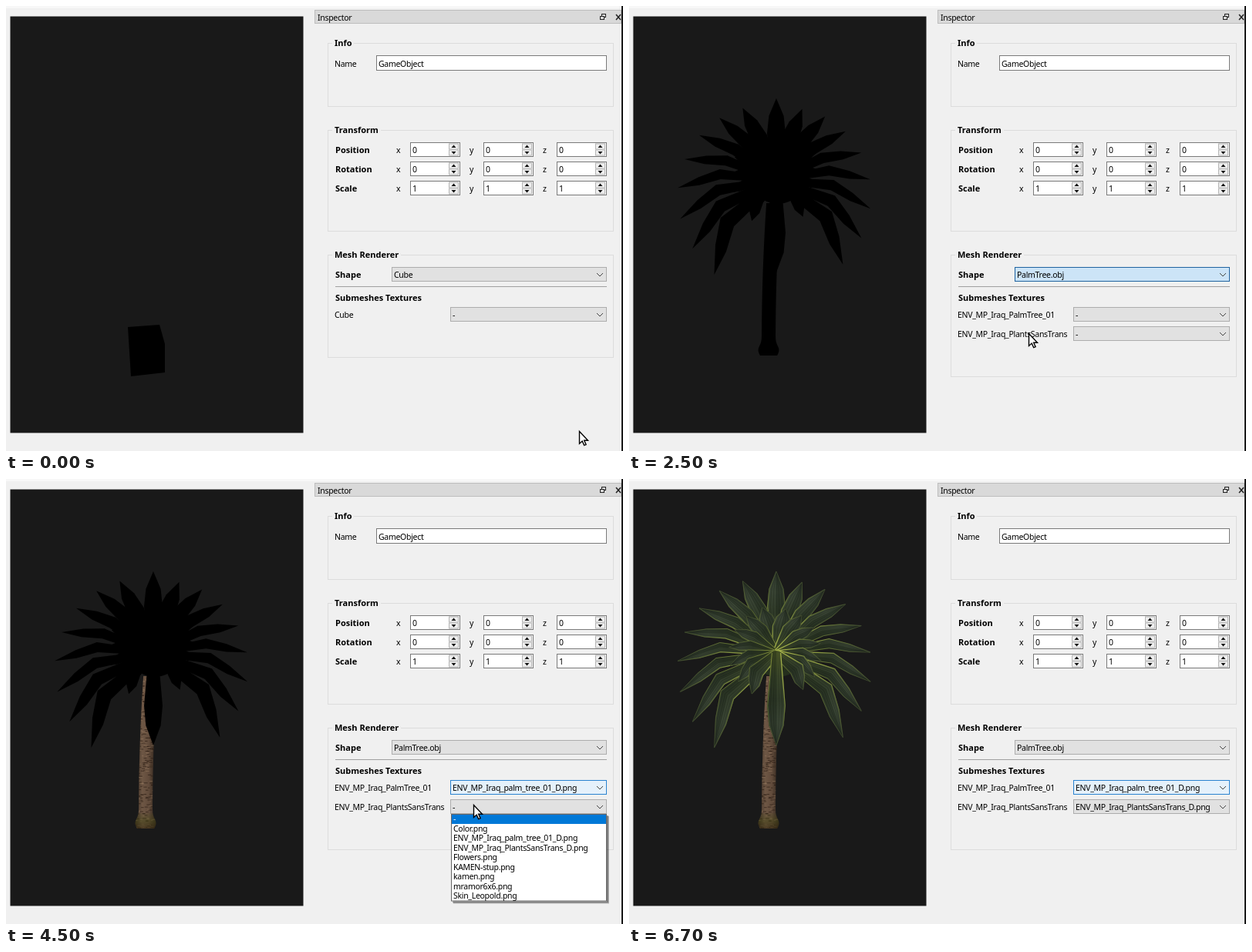
Animation of 800 by 578 pixels, one loop 7100 ms. Source, as an HTML page with a canvas:

```html
<!DOCTYPE html>
<html lang="en">
<head>
<meta charset="utf-8">
<title>Inspector</title>
<style>
html, body { margin: 0; width: 100%; height: 100%; overflow: hidden; background: #f0f0f0; }
canvas { display: block; }
</style>
</head>
<body>
<canvas id="stage" width="800" height="578"></canvas>
<script>
const ctx = document.getElementById('stage').getContext('2d');
const LOOP = 7100, ROW = 12.5;
const SHAPES = ['-', 'Cube', 'Sphere', 'Plane', 'bunny.obj', 'PalmTree.obj', 'Leopold.obj', 'dvorana.obj', 'arkada.obj', 'teapot.obj'];
const TEXTURES = ['-', 'Color.png', 'ENV_MP_Iraq_palm_tree_01_D.png', 'ENV_MP_Iraq_PlantsSansTrans_D.png', 'Flowers.png', 'KAMEN-stup.png', 'kamen.png', 'mramor6x6.png', 'Skin_Leopold.png'];

// Moments when a list opens and when its entry is chosen
const OPEN = { shape: 900, trunk: 3100, leaves: 4400 };
const PICK = { shape: 2500, trunk: 4000, leaves: 5400 };

// Pointer rests: arrival, departure, x, y
const STOPS = [
  [0, 0, 743, 552], [800, 1200, 519, 345], [1800, PICK.shape, 518, 425], [3000, 3200, 634, 400],
  [3600, PICK.trunk, 640, 441], [4300, 4600, 606, 423], [5200, 5700, 627, 480], [6400, LOOP, 650, 582]
];

const CROWN = [191, 226];

function seeded(seed) {
  return () => (seed = (seed * 16807) % 2147483647) / 2147483647;
}

function rect(x, y, w, h, fill, stroke) {
  ctx.fillStyle = fill;
  ctx.fillRect(x, y, w, h);
  if (!stroke) return;
  ctx.strokeStyle = stroke;
  ctx.lineWidth = 1;
  ctx.strokeRect(x + .5, y + .5, w - 1, h - 1);
}

function trace(points, closed = true) {
  ctx.beginPath();
  points.forEach(([x, y]) => ctx.lineTo(x, y));
  if (closed) ctx.closePath();
}

function shape(points, fill) {
  trace(points);
  ctx.fillStyle = fill;
  ctx.fill();
}

function line(points, color, width = 1) {
  trace(points, false);
  ctx.strokeStyle = color;
  ctx.lineWidth = width;
  ctx.stroke();
}

function text(str, x, y, { bold = false, color = '#000' } = {}) {
  ctx.font = bold ? 'bold 11px "Noto Sans", sans-serif' : '10.5px "Noto Sans", sans-serif';
  ctx.letterSpacing = bold ? '0px' : '-0.3px';
  ctx.fillStyle = color;
  ctx.fillText(str, x, y + 4);
}

function gradient(from, to, ...colors) {
  const g = ctx.createLinearGradient(...from, ...to);
  colors.forEach((c, i) => g.addColorStop(i / (colors.length - 1), c));
  return g;
}

function group(title, y, bottom, gapEnd) {
  ctx.strokeStyle = '#dcdcdc';
  ctx.lineWidth = 1;
  ctx.strokeRect(417.5, y + .5, 370, bottom - y);
  rect(423, y - 1, gapEnd - 423, 3, '#f0f0f0');
  text(title, 426, y, { bold: true });
}

function spinBox(x, y, value) {
  rect(x, y - 9, 65, 19, '#fff', '#7a7a7a');
  text(value, x + 3, y + 1);
  for (const dir of [-1, 1]) {
    const cy = y + .5 + dir * 4;
    rect(x + 50, cy - 4, 13, 8, '#f0f0f0', '#b4b4b4');
    shape([[x + 53.5, cy - dir * 1.5], [x + 59.5, cy - dir * 1.5], [x + 56.5, cy + dir * 2]], '#111');
  }
}

const LOOKS = {
  idle: ['#e1e1e1', '#adadad'],
  hover: ['#e5f1fb', '#2a83d0'],
  down: ['#cce4f7', '#1f63a0'],
  fading: ['#d2dfec', '#4b82b4']
};

function combo(x, y, label, look) {
  rect(x, y - 10, 779 - x, 19, ...LOOKS[look]);
  text(label, x + 3, y);
  line([[766, y - 2], [770, y + 2], [774, y - 2]], '#444');
}

function popup(x, top, items, selected, [px, py]) {
  const h = items.length * ROW + 1, w = 779 - x;
  rect(x + 3, top + 3, w, h, 'rgba(0,0,0,.25)');
  rect(x + 2, top + 2, w, h, 'rgba(0,0,0,.3)');
  rect(x, top, w, h, '#fff', '#666');
  if (px >= x && py >= top && py < top + h) selected = Math.floor((py - top) / ROW);
  items.forEach((item, i) => {
    const y = top + i * ROW;
    if (i === selected) rect(x + 1, Math.round(y) + 1, w - 2, 12, '#0078d7');
    text(item, x + 3, Math.round(y + 6), { color: i === selected ? '#fff' : '#000' });
  });
}

function drawTrunk(textured) {
  const left = [], right = [];
  for (let y = 256; y <= 454; y += 3) {
    const center = 181 + 6 * ((440 - y) / 182) ** 2;
    const half = 9 + 4.5 * Math.exp(-(((y - 447) / 8) ** 2));
    left.push([center - half, y]);
    right.unshift([center + half, y]);
  }
  const outline = [...left, ...right];
  if (!textured) return shape(outline, '#000');
  shape(outline, gradient([168, 0], [194, 0], '#3a2d22', '#6e5745', '#614b3b', '#2f241b'));
  ctx.save();
  trace(outline);
  ctx.clip();
  const rnd = seeded(77);
  for (let i = 0; i < 330; i++) {
    const x = 167 + rnd() * 28, y = 256 + rnd() * 198;
    rect(x, y, 2 + rnd() * 3, 1, rnd() < .55 ? 'rgba(35,22,14,.6)' : 'rgba(165,135,105,.4)');
  }
  rect(165, 434, 32, 20, gradient([0, 434], [0, 454], 'rgba(70,75,25,.1)', 'rgba(66,68,20,.5)', 'rgba(50,38,14,.6)'));
  ctx.restore();
}

// angle: degrees from straight up; side: -1 left, 1 right, 0 not drooping sideways
function drawLeaf(angle, side, length, textured) {
  const polar = (deg, r) => {
    const a = deg * Math.PI / 180;
    return [CROWN[0] + (side || 1) * Math.sin(a) * r, CROWN[1] - Math.cos(a) * r];
  };
  const tip = polar(angle, length);
  const elbow = polar(angle - Math.abs(side) * angle * .11, length * .57);
  const width = 13 + 11 * Math.cos(angle * Math.PI / 180) ** 2;
  const nx = (CROWN[1] - tip[1]) / length, ny = (tip[0] - CROWN[0]) / length;
  const shift = ([x, y], d) => [x + nx * d, y + ny * d];
  const outer = [(elbow[0] + tip[0]) / 2, (elbow[1] + tip[1]) / 2];
  const rib = k => [shift(CROWN, width * k * .5), shift(elbow, width * k), shift(outer, width * k * .8), tip];
  const outline = [...rib(.5), ...rib(-.5).reverse()];
  if (!textured) return shape(outline, '#000');

  shape(outline, gradient(CROWN, tip, '#4c5828', '#39452a', '#303b29', '#394434', '#333d31'));
  shape([...rib(.5), elbow, CROWN], 'rgba(15,22,15,.25)');
  for (let k = -.32; k < .4; k += .16) line(rib(k), 'rgba(15,20,12,.3)', .8);
  line(rib(.47), gradient(CROWN, tip, '#8d9a3e', '#6c7b34', '#3d482e'), .8);
  line(rib(-.47), gradient(CROWN, tip, '#a9b64c', '#9aa846', '#5e6c34', '#3d482e'), 1.2);
}

function drawPalm(trunkTextured, leavesTextured) {
  drawTrunk(trunkTextured);
  ctx.beginPath();
  ctx.ellipse(193, 217, 38, 40, 0, 0, 7);
  ctx.fillStyle = leavesTextured ? '#252f1d' : '#000';
  ctx.fill();
  const pair = (angle, length) => {
    drawLeaf(angle + 5, -1, length, leavesTextured);
    drawLeaf(angle, 1, length * .95, leavesTextured);
  };
  drawLeaf(0, 0, 106, leavesTextured);
  for (let a = 20; a < 145; a += 17.4) pair(a, 96 + a * .36);
  for (let a = 12; a < 150; a += 22) pair(a, 62);
  drawLeaf(180, 0, 120, leavesTextured);
}

function pointerAt(t) {
  const i = STOPS.findIndex(stop => stop[1] >= t);
  const [arrive, , x1, y1] = STOPS[i];
  if (t >= arrive) return [x1, y1];
  const [, leave, x0, y0] = STOPS[i - 1];
  const u = (t - leave) / (arrive - leave), e = u * u * (3 - 2 * u);
  return [x0 + (x1 - x0) * e, y0 + (y1 - y0) * e];
}

function drawPointer([x, y]) {
  const outline = [[0, 0], [0, 16], [3.7, 12.6], [6.2, 18.2], [8.6, 17.2], [6.2, 11.7], [11, 11.7]]
    .map(p => [p[0] + x + .5, p[1] + y + .5]);
  shape(outline, '#fff');
  trace(outline);
  ctx.strokeStyle = '#000';
  ctx.lineWidth = 1.4;
  ctx.stroke();
}

function drawPanel() {
  rect(0, 0, 800, 578, '#f0f0f0');
  rect(0, 0, 800, 3, '#f7f7f7');
  rect(400, 5, 398, 18, '#d9d9d9', '#bdbdbd');
  text('Inspector', 404, 15);
  ctx.strokeStyle = '#222';
  ctx.lineWidth = 1;
  ctx.strokeRect(772.5, 10.5, 5, 4);
  rect(770, 13, 6, 5, '#d9d9d9', '#222');
  line([[791, 11], [797, 18]], '#222', 1.5);
  line([[797, 11], [791, 18]], '#222', 1.5);
  rect(798, 0, 2, 578, '#1a1a1a');

  group('Info', 48, 130, 451);
  text('Name', 426, 75);
  rect(480, 64, 299, 20, '#fff', '#7a7a7a');
  text('GameObject', 483, 75);

  group('Transform', 161, 292, 486);
  ['Position', 'Rotation', 'Scale'].forEach((name, row) => {
    const y = 186 + row * 25;
    text(name, 427, y + 1, { bold: true });
    ['x', 'y', 'z'].forEach((axis, col) => {
      text(axis, 506 + col * 95, y + 1);
      spinBox(524 + col * 95, y, row === 2 ? '1' : '0');
    });
  });
}

function drawMesh(t, pointer) {
  const palm = t >= PICK.shape;
  const opened = key => t >= OPEN[key] && t < PICK[key];
  group('Mesh Renderer', 323, palm ? 481 : 456, 512);
  text('Shape', 427, 349, { bold: true });
  combo(500, 349, palm ? 'PalmTree.obj' : 'Cube',
    t < 800 || t >= 2900 ? 'idle' : palm ? 'down' : 'hover');
  rect(427, 364, 352, 1, '#a0a0a0');
  text('Submeshes Textures', 427, 379, { bold: true });
  text(palm ? 'ENV_MP_Iraq_PalmTree_01' : 'Cube', 426, 401);
  combo(576, 401, t >= PICK.trunk ? TEXTURES[2] : '-',
    t < 2900 ? 'idle' : t < 4200 && t >= OPEN.trunk ? 'down' : 'hover');
  if (palm) {
    text('ENV_MP_Iraq_PlantsSansTrans', 426, 426);
    combo(576, 426, t >= PICK.leaves ? TEXTURES[3] : '-',
      t >= PICK.leaves && t < 5900 ? 'fading' : 'idle');
  }
  if (opened('shape')) popup(500, 358, SHAPES, 1, pointer);
  if (opened('trunk')) popup(577, 410, TEXTURES, 0, pointer);
  if (opened('leaves')) popup(577, 435, TEXTURES, 0, pointer);
}

function draw(t) {
  const pointer = pointerAt(t);
  drawPanel();
  rect(5.5, 13.5, 380, 541, '#191919');
  if (t < PICK.shape) shape([[158, 417], [199, 414], [206, 439], [206, 476], [162, 481]], '#000');
  else drawPalm(t >= PICK.trunk, t >= PICK.leaves);
  drawMesh(t, pointer);
  drawPointer(pointer);
}

let shown = -1;
function tick() {
  const t = Math.floor(performance.now() % LOOP / 100) * 100;
  if (t !== shown) draw(shown = t);
  requestAnimationFrame(tick);
}
tick();
</script>
</body>
</html>
```
